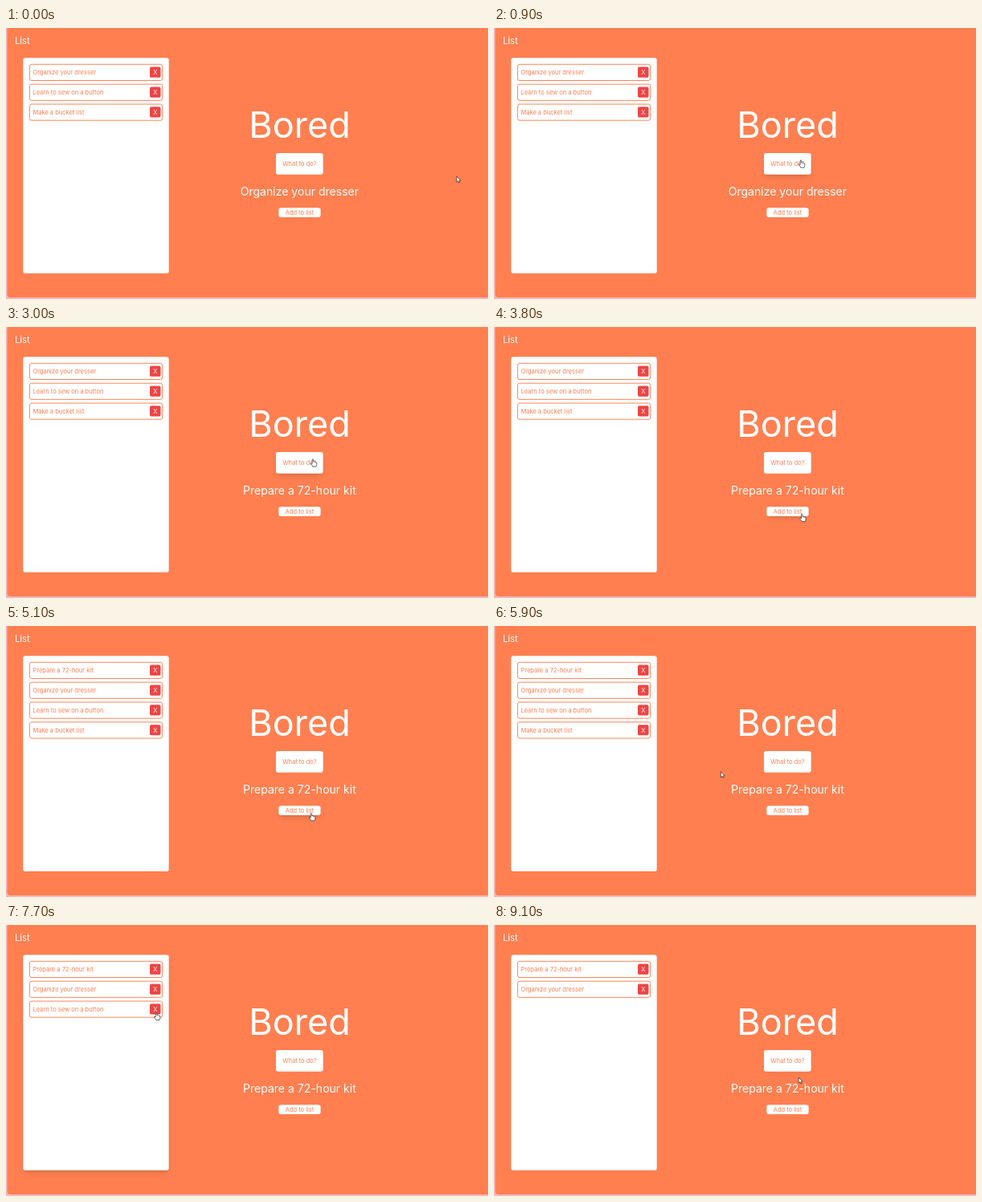
An HTML page that plays this animation: 600x338 px, repeating every 9.7 s.

```html
<!DOCTYPE html>
<html lang="en">
<head>
<meta charset="utf-8">
<title>Bored</title>
<style>
  html, body { margin: 0; width: 100%; height: 100%; overflow: hidden; background: #f4b5bc; }
  svg { display: block; width: 600px; height: 338px; cursor: default; }
  text { font: 400 7.5px Inter, "Open Sans", sans-serif; fill: #ff7f50; }
  .light { fill: #fff; }
  .mid { text-anchor: middle; }
</style>
</head>
<body>
<svg id="stage" viewBox="0 0 600 338" xmlns="http://www.w3.org/2000/svg">
  <defs>
    <filter id="wide" x="-50%" y="-100%" width="200%" height="300%"><feGaussianBlur stdDeviation="3.5"/></filter>
    <filter id="tight" x="-50%" y="-100%" width="200%" height="300%"><feGaussianBlur stdDeviation="1.4"/></filter>
  </defs>
  <rect x="1.5" y="-8" width="610" height="344" rx="4" fill="#ff7f50"/>
  <text class="light" x="11" y="19.7" style="font-size:11.25px">List</text>
  <text class="light mid" x="365.5" y="137" style="font-size:45px">Bored</text>
  <g id="boxes"></g>
  <g id="rows"></g>
  <text class="mid" x="365.4" y="172.1">What to do?</text>
  <text class="mid" x="365.5" y="232.8">Add to list</text>
  <text id="activity" class="light mid" x="365.4" y="208.5" style="font-size:14.06px"></text>
  <g id="cursor" fill="#fff" stroke="#333" stroke-width=".75" stroke-linejoin="round">
    <path id="arrow" d="M0 0V7.2L1.7 5.7 2.7 8 3.9 7.5 2.9 5.2H5Z"/>
    <path id="hand" d="M-.8 .8Q0-.3 .8 .8V3.6Q1.6 3 2.2 3.9Q3 3.3 3.6 4.2Q4.7 3.9 4.8 5V7Q4.7 8.3 4 9.6H-.1Q-.8 8.2-2.4 6.4Q-3.1 5.2-2 5.1L-.8 6Z"/>
  </g>
</svg>
<script>
const LOOP = 9700;
const FADE = 150;
const $ = id => document.getElementById(id);

function add(parent, tag, attrs, text) {
  const node = document.createElementNS("http://www.w3.org/2000/svg", tag);
  for (const key in attrs) node.setAttribute(key, attrs[key]);
  if (text) node.textContent = text;
  parent.appendChild(node);
  return node;
}

const panel = { x: 21.3, y: 37.3, width: 181.4, height: 268.7 };
const askButton = { x: 336, y: 156, width: 58.7, height: 26.8 };
const addButton = { x: 339.4, y: 224.2, width: 52.2, height: 11.8 };
const ROW_TOP = 45, ROW_PITCH = 24.85;
const removeButton = i => ({ x: 179, y: ROW_TOP + 3.6 + i * ROW_PITCH, width: 13.5, height: 13.2 });

// Start time of each state, in ms
const activities = [
  [0, "Organize your dresser"],
  [2100, "Do something you used to do as a kid"],
  [2900, "Prepare a 72-hour kit"]
];
const base = ["Organize your dresser", "Learn to sew on a button", "Make a bucket list"];
const full = ["Prepare a 72-hour kit", ...base];
const lists = [[0, base], [4200, full], [7100, full.slice(0, 3)], [8100, full.slice(0, 2)]];

// Pointer moves: start, end, target x, target y
const origin = [561, 185];
const moves = [
  [0, 900, 382, 164.5],
  [3300, 3800, 383.3, 233],
  [3800, 4000, 380, 233.3],
  [5400, 6400, 185.2, 130.3],
  [6400, 6600, 184.8, 129.6],
  [7100, 7700, 187, 109],
  [8600, 9100, 379.2, 190]
];

const stateAt = (states, t) => states.filter(s => s[0] <= t).pop()[1];
const ease = p => p * p * (3 - 2 * p);
const inside = (r, [x, y]) => x >= r.x && x <= r.x + r.width && y >= r.y && y <= r.y + r.height;

function pointerAt(t) {
  let [x, y] = origin;
  for (const [start, end, toX, toY] of moves) {
    if (t <= start) break;
    const p = ease(Math.min(1, (t - start) / (end - start)));
    x += (toX - x) * p;
    y += (toY - y) * p;
  }
  return [x, y];
}

// Share of the last FADE ms that the pointer spent over the box
function hoverAmount(box, t) {
  const samples = 10;
  let hits = 0;
  for (let i = 0; i < samples; i++) {
    if (inside(box, pointerAt(Math.max(0, t - i * FADE / samples)))) hits++;
  }
  return hits / samples;
}

function shadowLayer(parent, box, dy, inset, filter) {
  add(parent, "rect", {
    x: box.x + inset, y: box.y + inset + dy,
    width: box.width - 2 * inset, height: box.height - 2 * inset,
    rx: 2.8, "fill-opacity": 0.12, filter: `url(#${filter})`
  });
}

const cards = [panel, askButton, addButton].map(box => {
  const shadow = add($("boxes"), "g", {});
  shadowLayer(shadow, box, 4.7, 1.4, "wide");
  shadowLayer(shadow, box, 1.9, 1.9, "tight");
  add($("boxes"), "rect", { ...box, rx: 2.8, fill: "#fff" });
  return { box, shadow };
});

const rows = full.map((_, i) => {
  const group = add($("rows"), "g", {});
  const y = ROW_TOP + i * ROW_PITCH;
  add(group, "rect", {
    x: 29.4, y: y + 0.3, width: 165.3, height: 20.2, rx: 2.5,
    fill: "none", stroke: "#ff7f50", "stroke-width": 0.95
  });
  const label = add(group, "text", { x: 33.4, y: y + 13.1 });
  add(group, "rect", { ...removeButton(i), rx: 1.9, fill: "#ef4444" });
  add(group, "text", { x: 185.7, y: y + 13.1, class: "light mid" }, "X");
  return { group, label };
});

const show = (node, visible) => node.setAttribute("display", visible ? "inline" : "none");

function render(t) {
  const list = stateAt(lists, t);
  rows.forEach(({ group, label }, i) => {
    show(group, i < list.length);
    label.textContent = list[i] || "";
  });
  $("activity").textContent = stateAt(activities, t);
  for (const { box, shadow } of cards) shadow.setAttribute("opacity", hoverAmount(box, t));

  const pointer = pointerAt(t);
  const clickable = [askButton, addButton, ...list.map((_, i) => removeButton(i))];
  const pointing = clickable.some(box => inside(box, pointer));
  $("cursor").setAttribute("transform", `translate(${pointer})`);
  show($("hand"), pointing);
  show($("arrow"), !pointing);
}

const began = performance.now();
function tick() {
  render((performance.now() - began) % LOOP);
  requestAnimationFrame(tick);
}
tick();
</script>
</body>
</html>
```
